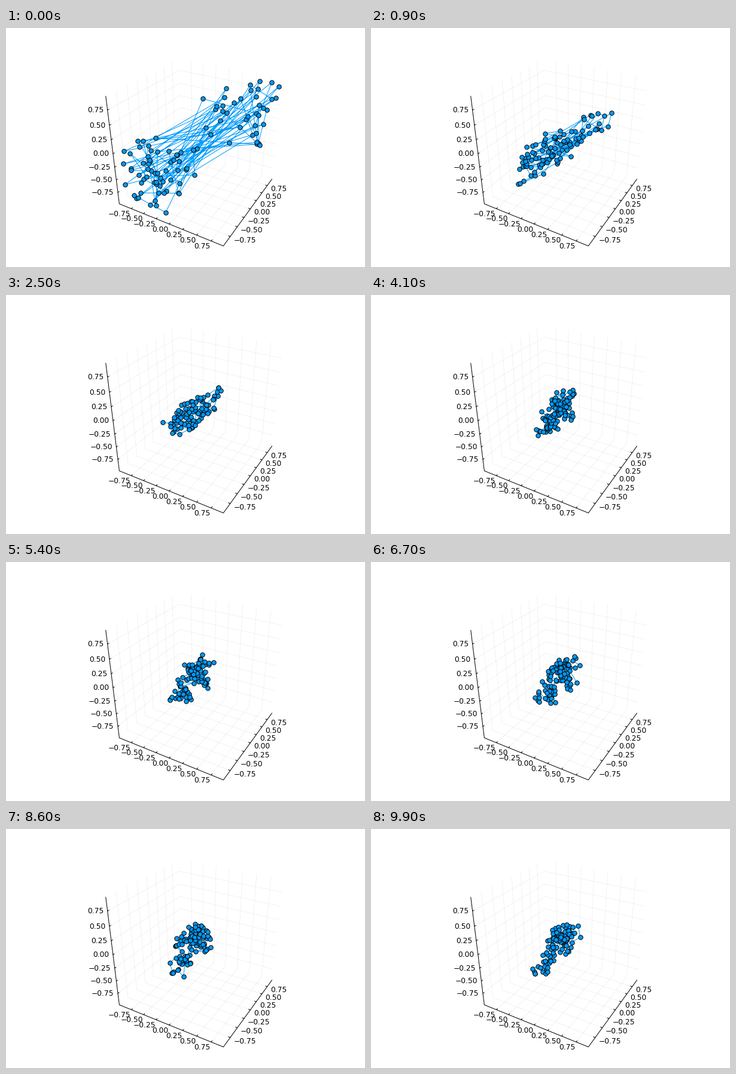
Recreate the animation shown at these times as a matplotlib script. Size 600x400 px, loop 10 s.

```python
import numpy as np
import matplotlib.pyplot as plt
from matplotlib.animation import FuncAnimation

W, H = 600, 400
FRAMES, INTERVAL = 100, 100
BEADS = 100
BLUE = "#009AF9"
PX = 0.72  # points per pixel at 100 dpi

# Axis ranges: centre of x, y, z and the shared half width
MIDDLE = np.array([-0.025, 0.0, -0.01])
HALF = 0.978
TICKS = np.arange(-0.75, 0.76, 0.25)

# Perspective camera: azimuth 30, elevation 30, field of view 30 degrees
RIGHT = np.array([0.866, 0.5, 0.0])
UP = np.array([-0.25, 0.433, 0.866])
FORWARD = np.array([-0.433, 0.75, -0.5])
DISTANCE = np.sqrt(3) / np.sin(np.radians(15))
FOCAL = 1 / np.tan(np.radians(15))
CENTER, SCALE = np.array([322.5, 192.1]), 179.5


def project(points):
    """Map points of the [-1, 1] cube to pixels."""
    p = np.asarray(points, float)
    k = SCALE * FOCAL / (DISTANCE + p @ FORWARD)
    return CENTER + np.column_stack([k * (p @ RIGHT), -k * (p @ UP)])


fig = plt.figure(figsize=(W / 100, H / 100), dpi=100, facecolor="white")
ax = fig.add_axes([0, 0, 1, 1])
ax.set_xlim(0, W)
ax.set_ylim(H, 0)
ax.axis("off")


def edge(*corners, **style):
    ax.plot(*project(corners).T, **style)


def label(value, corner, dx, dy, ha):
    x, y = project([corner])[0]
    text = f"{value:.2f}".replace("-", "\u2212")
    ax.text(x + dx, y + dy, text, ha=ha, va="center_baseline",
            fontsize=12.2 * PX, family="DejaVu Sans", color="black")


def draw_box():
    grid = dict(color="black", alpha=0.1, lw=0.5 * PX, zorder=1)
    axis = dict(color="black", lw=PX, zorder=2)
    d = 0.03
    for v in TICKS:
        x, y, z = (v - MIDDLE) / HALF
        edge((x, -1, -1), (x, 1, -1), (x, 1, 1), **grid)
        edge((1, y, -1), (-1, y, -1), (-1, y, 1), **grid)
        edge((-1, -1, z), (-1, 1, z), (1, 1, z), **grid)
        edge((x, -1, -1), (x, -1 + d, -1), **axis)
        edge((1, y, -1), (1 - d, y, -1), **axis)
        edge((-1, -1, z), (-1, -1 + d, z), **axis)
        label(v, (x, -1, -1), -1, 7.6, "right")
        label(v, (1, y, -1), 5.5, 4.6, "left")
        label(v, (-1, -1, z), -6.6, -1, "right")
    edge((-1, -1, 1), (-1, -1, -1), (1, -1, -1), (1, 1, -1), **axis)


# Rough pixel path on which the relaxed chain settles
BACKBONE = np.array([(278, 236), (300, 222), (302, 190), (326, 166),
                     (326, 192), (312, 172), (334, 172)])
STIFFNESS, RETURN, KICK = 0.08, 0.03, 3.0


def simulate():
    rng = np.random.default_rng(12)

    # Each bead starts in the all-positive or all-negative octant
    chance = np.linspace(0.25, 0.65, BEADS)
    sign = np.where(rng.random(BEADS) < chance, 1, -1)
    start = sign[:, None] * rng.random((BEADS, 3))

    s = np.linspace(0, len(BACKBONE) - 1, BEADS)
    knots = np.arange(len(BACKBONE))
    rest = np.column_stack([np.interp(s, knots, c) for c in BACKBONE.T])

    # Neighbours attract, the backbone pulls, and random kicks keep it alive
    offset = project((start - MIDDLE) / HALF) - rest
    path = []
    for _ in range(FRAMES):
        path.append(rest + offset)
        padded = np.pad(offset, ((1, 1), (0, 0)), mode="edge")
        mean = (padded[:-2] + padded[2:]) / 2
        offset = (offset + STIFFNESS * (mean - offset) - RETURN * offset
                  + rng.normal(0, KICK, offset.shape))
    return path


draw_box()
path = simulate()
chain, = ax.plot([], [], color=BLUE, lw=PX, marker="o", ms=7.4 * PX,
                 mfc=BLUE, mec="black", mew=PX, zorder=3)


def update(i):
    chain.set_data(*path[i].T)
    return chain,


anim = FuncAnimation(fig, update, frames=FRAMES, interval=INTERVAL, repeat=True)
plt.show()
```
